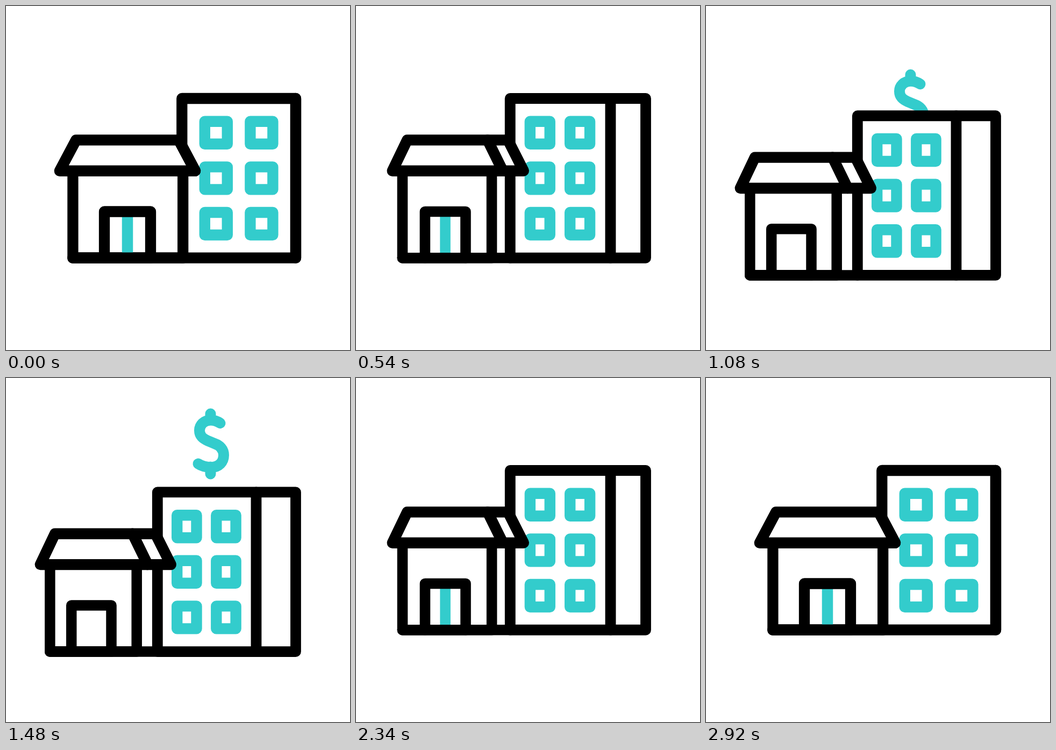
Recreate the animation shown at these times as an HTML page with a canvas. Size 640 by 640 pixels, loop 3880 ms.

```html
<!DOCTYPE html>
<html lang="en">
<head>
<meta charset="utf-8">
<title>House and tower</title>
<style>
html, body { margin: 0; width: 100%; height: 100%; overflow: hidden; background: #fff; }
canvas { display: block; width: 100vw; height: 100vh; }
</style>
</head>
<body>
<canvas id="stage" width="640" height="640"></canvas>
<script>
const LOOP = 3880, STEP = 20;
const TEAL = '#33cccc', INK = '#000';
const ctx = document.getElementById('stage').getContext('2d');
ctx.lineJoin = ctx.lineCap = 'round';

const ramp = (t, from, to) => Math.min(1, Math.max(0, (t - from) / (to - from)));
const smooth = u => (1 - Math.cos(Math.PI * u)) / 2;
const quadOut = u => 1 - (1 - u) ** 2;
// Gentle start, soft landing.
const glide = u => 0.6 * u * (1 - u) ** 2 + 3 * u * u - 2 * u ** 3;

const dollar = new Path2D(
  'M398.5 83.5C391 78.5 386 78 381 78C368 78 360 87 360 97' +
  'C360 107 366 112 376 116.5L388 121.5C398 125 405 132 405 143' +
  'C405 156 396 165.5 382 165.5C372 165.5 364 163.5 357.5 159' +
  'M380.5 66V78M380.5 165V178');

function poly(points, closed = true, fill = true) {
  ctx.beginPath();
  points.forEach(([x, y]) => ctx.lineTo(x, y));
  if (closed) ctx.closePath();
  if (fill) ctx.fill();
  ctx.stroke();
}

const box = (l, t, r, b) => poly([[l, t], [r, t], [r, b], [l, b]]);

function pose(t) {
  return {
    turn: glide(ramp(t, 0, 700)) - glide(ramp(t, 2250, 2920)),
    sink: 40.4 * (ramp(t, 740, 1166) - ramp(t, 1990, 2262)),
    rise: 174 * (quadOut(ramp(t, 720, 1720)) - smooth(ramp(t, 1720, 2100))),
    slide: 48 * (smooth(ramp(t, 720, 1220)) - smooth(ramp(t, 1740, 2240)))
  };
}

function draw(t) {
  const { turn, sink, rise, slide } = pose(t);
  const mix = (a, b) => a + (b - a) * turn;
  const base = 468.7;

  ctx.fillStyle = '#fff';
  ctx.fillRect(0, 0, 640, 640);

  if (rise > 0) {
    ctx.save();
    ctx.translate(0, 164.5 - rise);
    ctx.strokeStyle = TEAL;
    ctx.lineWidth = 20;
    ctx.stroke(dollar);
    ctx.restore();
  }

  ctx.save();
  ctx.translate(0, sink);

  // Tower
  ctx.strokeStyle = INK;
  ctx.lineWidth = mix(20.3, 19.8);
  const edge = mix(539, 465.5);
  box(mix(327.3, 281.8), 172, 539, base);
  poly([[edge, 172], [edge, base]], false, false);

  // Windows
  ctx.strokeStyle = TEAL;
  ctx.lineWidth = 20.4;
  const w = mix(42, 36.3);
  for (const x of [mix(369.8, 318.2), mix(454.4, 391.3)])
    for (let row = 0; row < 3; row++) {
      const y = 214.8 + row * 84.6;
      box(x, y, x + w, y + 42);
    }

  // House front
  ctx.strokeStyle = INK;
  ctx.lineWidth = mix(20.3, 19.5);
  const left = mix(124.4, 81.8);
  box(left, 306.7, mix(329.2, 243.2), base);
  poly([[left, base], [mix(329.2, 281.8), base]], false, false);

  // Door
  const doorL = mix(183, 121.7), doorR = mix(269, 196);
  const leaf = mix(20.5, 19.4);
  const leafX = mix(226, 158.7) - leaf / 2 + slide;
  const shown = Math.min(leaf, doorR - leafX);
  if (shown > 0) {
    ctx.fillStyle = TEAL;
    ctx.fillRect(leafX, 383, shown, base - 383);
    ctx.fillStyle = '#fff';
  }
  poly([[doorL, base], [doorL, 382.5], [doorR, 382.5], [doorR, base]], false, false);
  poly([[left, base], [doorR, base]], false, false);

  // Roof
  ctx.lineWidth = 20.4;
  poly([[mix(130.3, 91), 249.4], [mix(321.5, 278), 249.4],
        [mix(352, 306.8), 306.7], [mix(99.8, 63.8), 306.7]]);
  poly([[mix(321.5, 235.5), 249.4], [mix(352, 263.5), 306.7]], false, false);

  ctx.restore();
}

const start = performance.now();
function tick() {
  const t = (performance.now() - start) % LOOP;
  draw(Math.floor(t / STEP) * STEP);
  requestAnimationFrame(tick);
}
tick();
</script>
</body>
</html>
```
